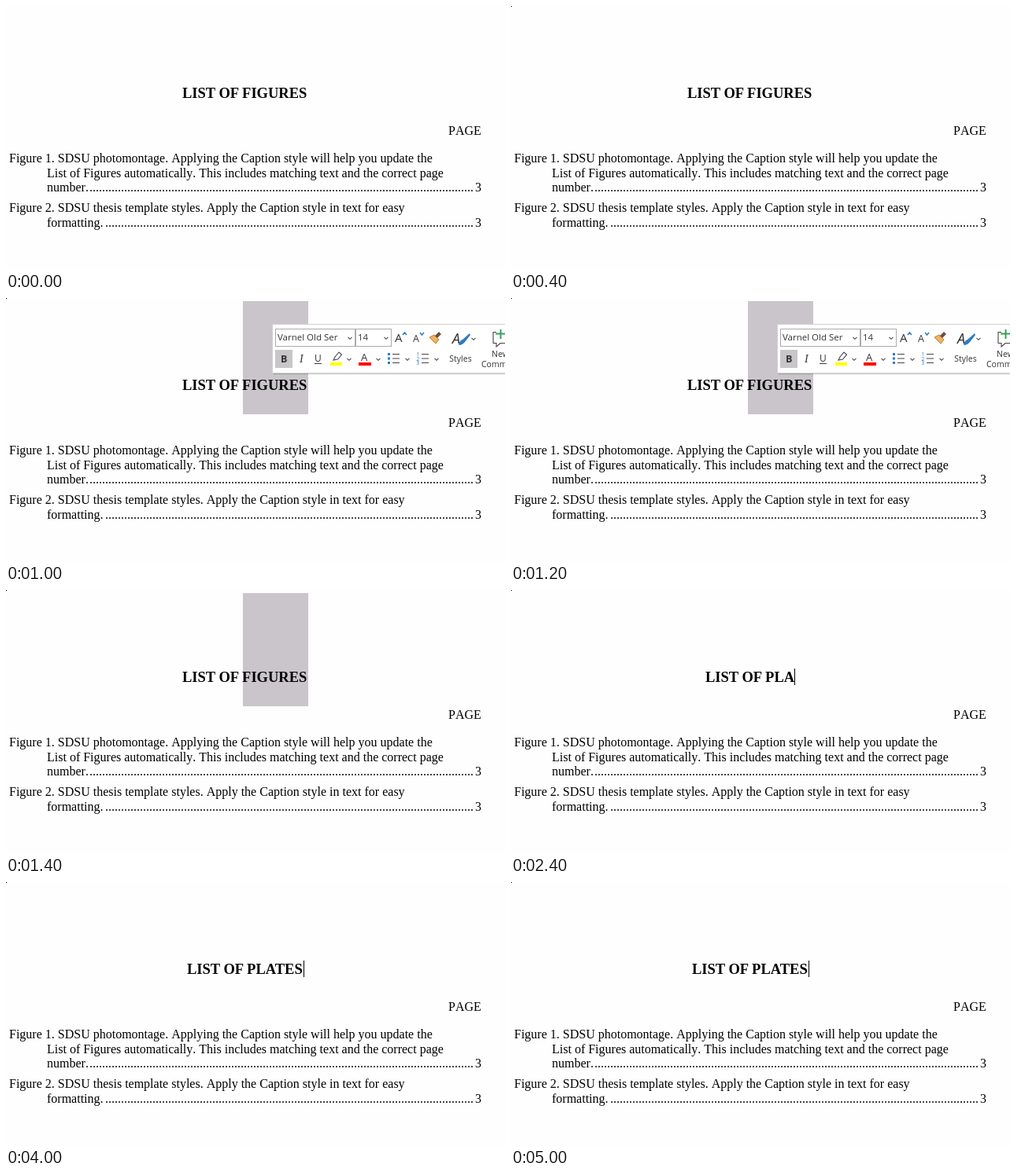
An HTML page for the animation above (5.2 s loop, 634 by 336 pixels).

```html
<!DOCTYPE html>
<html lang="en">
<head>
<meta charset="utf-8">
<title>List of figures</title>
<style>
  html, body { margin: 0; width: 100%; height: 100%; overflow: hidden; background: #fefefe; }
  svg { display: block; width: 634px; height: 336px; }
  text { font-kerning: none; font-variant-ligatures: none; white-space: pre; }
  .doc { font: 16px "Liberation Serif", serif; }
  .head { font: bold 18.5px "Liberation Serif", serif; }
  .ui { font: 10.5px "Open Sans", sans-serif; fill: #333; }
  .field { font-size: 11.5px; }
  .line { fill: none; stroke: #444; stroke-width: 1.1; }
  .blue { fill: none; stroke: #2b7cc4; stroke-width: 1.5; }
</style>
</head>
<body>
<svg viewBox="0 0 634 336">
  <defs>
    <path id="chev" class="line" d="M-2.5 -1.2 L0 1.3 L2.5 -1.2"/>
    <clipPath id="nameClip"><rect x="343" y="40" width="87" height="20"/></clipPath>
  </defs>
  <rect width="634" height="336" fill="#fefefe"/>
  <rect id="dot" width="1" height="1"/>
  <rect id="sel" x="301" y="4" width="83" height="144" fill="#c9c5ca"/>
  <text id="title" class="head" y="117"></text>
  <rect id="caret" y="100" width="1" height="21"/>
  <g id="body" class="doc"></g>

  <g id="bar">
    <rect x="340" y="35" width="300" height="63" fill="#000" opacity=".07"/>
    <rect x="339" y="34" width="300" height="63" fill="#000" opacity=".1"/>
    <rect x="338.5" y="33.5" width="300" height="62" fill="#fff" stroke="#d0d0d0"/>
    <g fill="#fff" stroke="#ababab">
      <rect x="342.5" y="39.5" width="101" height="22"/>
      <rect x="444.5" y="39.5" width="45" height="22"/>
    </g>
    <text class="ui field" x="345" y="54" clip-path="url(#nameClip)">Varnel Old Ser</text>
    <text class="ui field" x="447" y="54">14</text>
    <rect x="342" y="66" width="22" height="23" fill="#c8c6c8"/>
    <g class="ui">
      <text x="494" y="56" font-size="15" style="font-size:15px">A</text>
      <text x="517" y="56" style="font-size:12.5px">A</text>
      <text x="349" y="82" style="font-weight:bold;font-size:12.5px">B</text>
      <text x="373" y="82" style="font:italic 14px 'Liberation Serif',serif">I</text>
      <text x="392" y="81" style="font-size:12px">U</text>
      <text x="451" y="80" style="font-size:13px">A</text>
      <text x="567" y="58" style="font-style:italic;font-size:18px">A</text>
      <text x="577.5" y="81" text-anchor="middle">Styles</text>
      <text x="617" y="75">New</text>
      <text x="604" y="88">Comment</text>
    </g>
    <path class="blue" stroke-width="1.2" d="M504 47 l2.5 -3 2.5 3 M526 44 l2.5 3 2.5 -3"/>
    <path class="line" d="M392 83.5 h9"/>
    <!-- format brush -->
    <path d="M538 50 l6 -3 6 6 -4 5 z" fill="#f0b266" stroke="#c47a24"/>
    <path d="M545 48 l5 -5 3 3 -5 5 z" fill="#6b5140"/>
    <!-- highlighter and font colour -->
    <path class="line" fill="#ddd" d="M416 79 l2 -4 5 -6 3.5 3 -5 6 z"/>
    <rect x="412" y="82" width="15" height="4" fill="#ffff00"/>
    <rect x="448" y="82" width="16" height="4" fill="#ff0000"/>
    <g id="lists"></g>
    <!-- styles pen -->
    <path d="M575 60 q1 -6 5 -7 l9 -8 1 2 -7 9 q-3 4 -8 4 z" fill="#2b7cc4"/>
    <!-- comment -->
    <path class="line" d="M634 57.5 h-6 l-5 4.5 v-4.5 h-4 v-14 h4"/>
    <path d="M622 45.5 h12 M628.5 40 v12" stroke="#36a05a" stroke-width="2"/>
    <g id="chevs"></g>
  </g>
</svg>
<script>
const LOOP = 5200;
const $ = id => document.getElementById(id);
const NS = "http://www.w3.org/2000/svg";

function add(parent, tag, attrs, text) {
  const el = document.createElementNS(NS, tag);
  for (const k in attrs) el.setAttribute(k, attrs[k]);
  if (text) el.textContent = text;
  $(parent).appendChild(el);
}

const lines = [
  [562, 164, "PAGE"],
  [4, 199, "Figure 1. SDSU photomontage. Applying the Caption style will help you update the"],
  [52, 218, "List of Figures automatically. This includes matching text and the correct page"],
  [52, 236, "number."],
  [106, 236, ".".repeat(122)],
  [596, 236, "3"],
  [4, 262, "Figure 2. SDSU thesis template styles. Apply the Caption style in text for easy"],
  [52, 281, "formatting."],
  [126, 281, ".".repeat(117)],
  [596, 281, "3"]
];
for (const [x, y, s] of lines) add("body", "text", { x, y }, s);

for (const [x, y] of [[437, 51], [483, 51], [594, 52], [436, 78], [473, 78], [510, 78], [547, 78]])
  add("chevs", "use", { href: "#chev", x, y });

for (let i = 0; i < 3; i++) {
  const y = 71.5 + i * 5.5;
  add("lists", "rect", { x: 485, y: y - 1.5, width: 3, height: 3, fill: "#2b7cc4" });
  add("lists", "path", { class: "line", d: `M491 ${y} h9 M528 ${y} h9` });
  add("lists", "text", { x: 521.5, y: y + 2.5, fill: "#2b7cc4", style: "font:6.5px 'Open Sans',sans-serif" }, String(i + 1));
}

// start time, title ending, title x, caret x
const titles = [
  [0, "FIGURES", 224, 0],
  [2400, "PLA", 247, 360],
  [2600, "PLATE", 235, 372],
  [2800, "PLATES", 230, 378]
];

const within = (t, a, b) => t >= a && t < b;
const show = (id, on) => $(id).setAttribute("visibility", on ? "visible" : "hidden");

function draw(t) {
  const [, word, x, caretX] = titles.filter(s => t >= s[0]).pop();
  $("title").textContent = "LIST OF " + word;
  $("title").setAttribute("x", x);
  $("caret").setAttribute("x", caretX);
  const dim = within(t, 3400, 3800) || within(t, 4400, 4600);
  $("caret").setAttribute("opacity", dim ? 0.2 : 1);
  show("caret", t >= 2400 && !within(t, 3800, 4000) && !within(t, 4600, 5000));
  show("dot", t >= 400);
  show("sel", within(t, 800, 2400));
  show("bar", within(t, 1000, 1400));
}

const start = performance.now();
function tick() {
  draw((performance.now() - start) % LOOP);
  requestAnimationFrame(tick);
}
draw(0);
requestAnimationFrame(tick);
</script>
</body>
</html>
```
